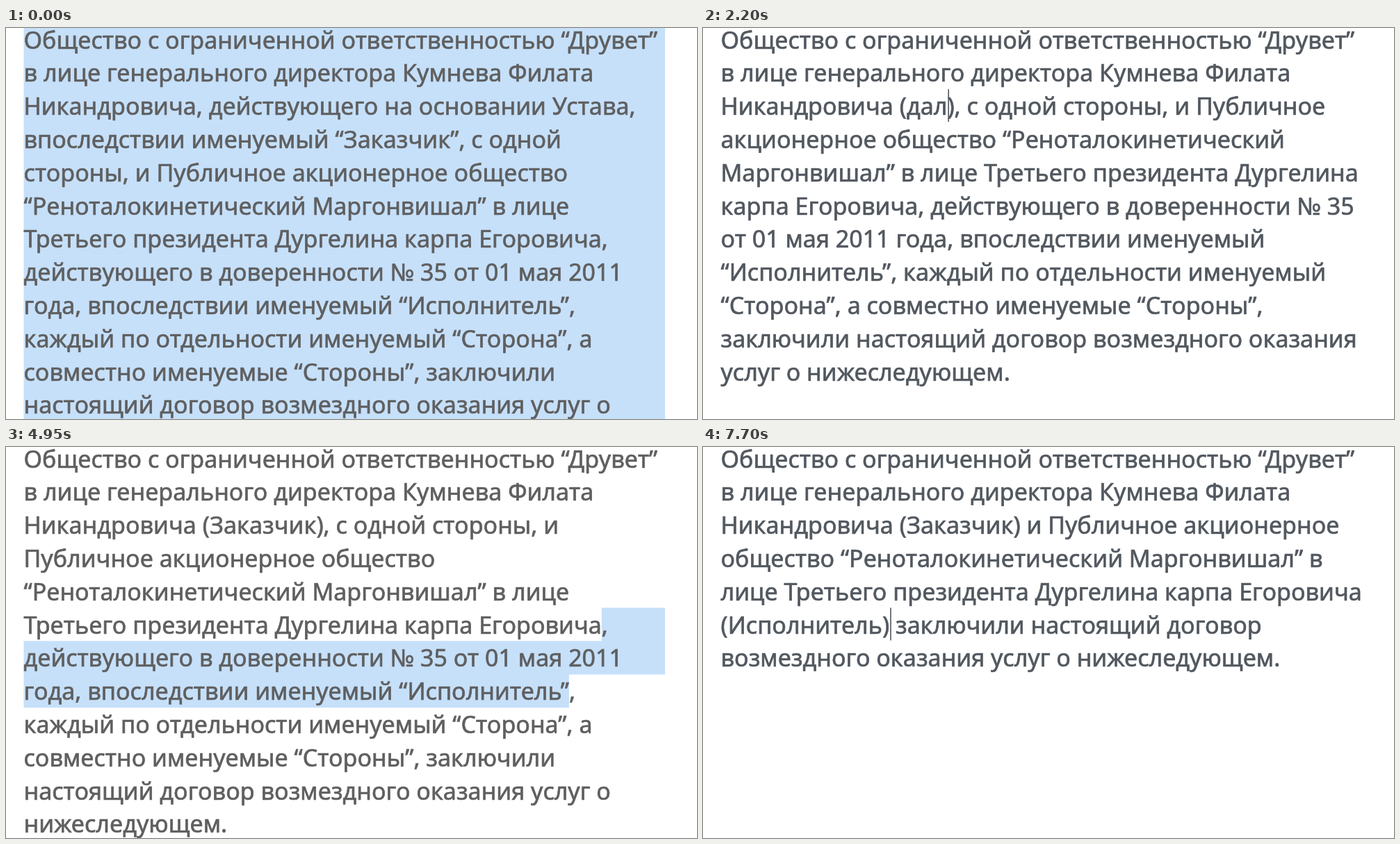
Recreate the animation shown at these times as an HTML page. Size 994x563 px, loop 8000 ms.

```html
<!DOCTYPE html>
<html lang="ru">
<head>
<meta charset="utf-8">
<title>Правка договора</title>
<style>
  html, body { margin: 0; width: 100%; height: 100%; overflow: hidden; background: #fff; }
  svg { display: block; width: 100vw; height: 100vh; }
  text {
    font: 400 34px "Noto Sans", "Open Sans", sans-serif;
    stroke-width: .7px;
    white-space: pre;
  }
</style>
</head>
<body>
<svg viewBox="0 0 994 563">
  <g id="marks" fill="#c6e0fa"></g>
  <g id="lines"></g>
  <rect id="caret" width="1.6" height="47" fill="#52585f"/>
</svg>
<script>
const LOOP = 8000, STEP = 550;
const LEFT = 25.5, RIGHT = 948, BASE = 29.5, PITCH = 47.8, ASCENT = 37;

// Markup: | is the caret, [ and ] bound the selection, / breaks a line.
const head = 'Общество с ограниченной ответственностью “Друвет”/в лице генерального директора Кумнева Филата/Никандровича';
const firm = '“Реноталокинетический Маргонвишал”';
const boss = 'Третьего президента Дургелина карпа Егоровича';
const proxy = ',/действующего в доверенности № 35 от 01 мая 2011/года, впоследствии именуемый “Исполнитель”';
const sides = ',/каждый по отдельности именуемый “Сторона”, а/совместно именуемые “Стороны”, заключили/настоящий договор возмездного оказания услуг о/нижеследующем.';
const sidesLow = 'каждый по отдельности именуемый/“Сторона”, а совместно именуемые “Стороны”,/';
const signLow = 'заключили настоящий договор возмездного оказания/услуг о нижеследующем.';
const sign = ' заключили настоящий договор/возмездного оказания услуг о нижеследующем.';
const body = `/${firm} в лице/${boss}${proxy}${sides}`;
const wide = `, с одной стороны, и Публичное/акционерное общество “Реноталокинетический/Маргонвишал” в лице Третьего президента Дургелина/карпа Егоровича, действующего в доверенности № 35/от 01 мая 2011 года, впоследствии именуемый/“Исполнитель”, ${sidesLow}${signLow}`;
const party = ', с одной стороны, и/Публичное акционерное общество';
const client = `${head} (Заказчик)`;
const short = `${client}${party}/${firm} в лице/${boss}`;
const joint = ` и Публичное акционерное/общество ${firm} в/лице ${boss}/`;

const steps = [
  `[${head}, действующего на основании Устава,/впоследствии именуемый “Заказчик”, с одной/стороны, и Публичное акционерное общество${body}`,
  `${head}| впоследствии именуемый “Заказчик”, с/одной стороны, и Публичное акционерное общество${body}`,
  `${head} (|впоследствии именуемый “Заказчик”),/с одной стороны, и Публичное акционерное/общество ${firm} в/лице Третьего президента Дургелина карпа/Егоровича, действующего в доверенности № 35 от 01/мая 2011 года, впоследствии именуемый/“Исполнитель”, ${sidesLow}${signLow}`,
  `${head} (|)${wide}`,
  `${head} (дал|)${wide}`,
  `${head} (далее Зак|)${party}${body}`,
  `${head} (далее Заказчик|)${party}${body}`,
  `${head} (далее |Заказчик)${party}${body}`,
  `${head} ( |Заказчик)${party}${body}`,
  `${short}[${proxy}]${sides}`,
  `${short} ()|${sides}`,
  `${short}/(Исполнитель)|, ${sidesLow}${signLow}`,
  `${short}/(Исполнитель),|${sign}`,
  `${client}|${joint}(Исполнитель),${sign}`,
  `${client}${joint}(Исполнитель)|${sign}`
];

const [marks, lines, caret] = ['marks', 'lines', 'caret'].map(id => document.getElementById(id));

function add(parent, tag, attrs) {
  const el = document.createElementNS('http://www.w3.org/2000/svg', tag);
  for (const key in attrs) el.setAttribute(key, attrs[key]);
  return parent.appendChild(el);
}

function show(source) {
  marks.replaceChildren();
  lines.replaceChildren();
  const color = source.includes('[') ? '#5f5f60' : '#52585f';
  lines.setAttribute('fill', color);
  lines.setAttribute('stroke', color);
  caret.style.display = source.includes('|') ? '' : 'none';
  let selecting = false;

  source.split('/').forEach((raw, row) => {
    const y = BASE + row * PITCH;
    const text = add(lines, 'text', { x: LEFT, y });
    text.textContent = raw.replace(/[|[\]]/g, '');
    const xOf = mark => {
      const at = raw.indexOf(mark);
      return LEFT + (at > 0 ? text.getSubStringLength(0, at) : 0);
    };
    if (raw.includes('|')) {
      caret.setAttribute('x', xOf('|') + 1);
      caret.setAttribute('y', y - ASCENT);
    }
    const opens = raw.includes('['), closes = raw.includes(']');
    if (opens || selecting) {
      const from = opens ? xOf('[') : LEFT, to = closes ? xOf(']') : RIGHT;
      add(marks, 'rect', { x: from, y: y - ASCENT, width: to - from, height: PITCH + .5 });
      selecting = !closes;
    }
  });
}

let current = -1;
function tick(now) {
  const next = Math.min(Math.floor(now % LOOP / STEP), steps.length - 1);
  if (next !== current) show(steps[current = next]);
  requestAnimationFrame(tick);
}
tick(0);
</script>
</body>
</html>
```
